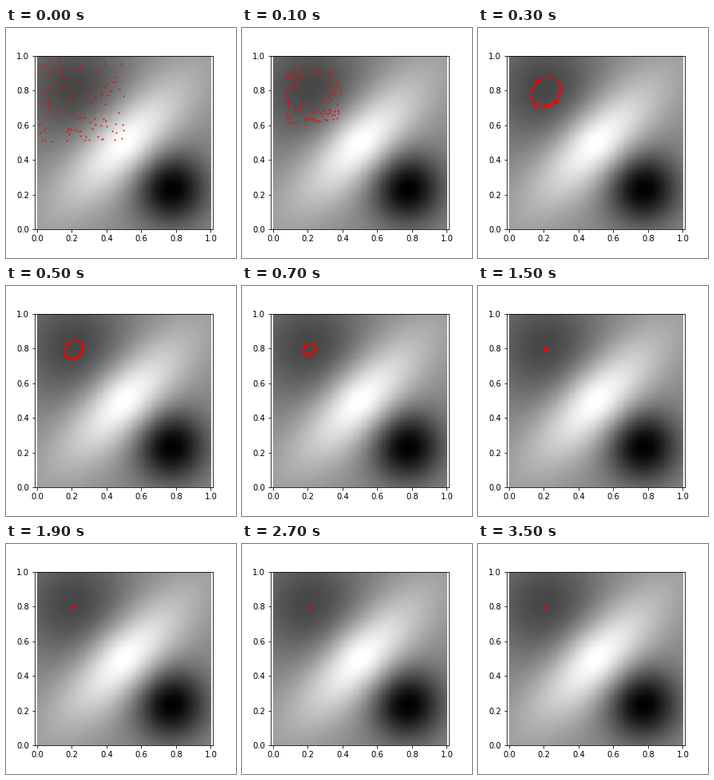
Recreate the animation shown at these times as a matplotlib script. Size 288 px wide and 288 px high, loop 5 s.

```python
import numpy as np
import matplotlib.pyplot as plt
from matplotlib.animation import FuncAnimation

FRAMES, STEP = 50, 100
POINTS = 115
GOAL = np.array([0.209, 0.794])
RING = 0.162      # ring radius at the first step, in data units
SHRINK = 0.79     # contraction of the ring per step
REST = 0.003      # radius that remains in the end
SETTLE = 0.55     # how fast points fall onto the ring

plt.rcParams.update({"font.family": "DejaVu Sans", "font.size": 10})


def landscape(n=100):
    """Grey levels: a bright diagonal ridge between two hollows."""
    x, y = np.meshgrid(*[(np.arange(n) + 0.5) / n] * 2)
    along, across = (x + y - 1) / np.sqrt(2), (x - y) / np.sqrt(2)
    ridge = np.exp(-np.abs(along / 0.45) ** 1.5 - (across / 0.19) ** 2)

    def hollow(cx, cy, width):
        return np.exp(-((x - cx) ** 2 + (y - cy) ** 2) / (2 * width ** 2))

    return (138 + 137 * ridge
            - 140 * hollow(0.77, 0.235, 0.145)
            - 68 * hollow(0.21, 0.81, 0.23))


rng = np.random.default_rng(11)
start = rng.uniform((0, 0.5), (0.5, 1), (POINTS, 2))
offset = start - GOAL
angle = np.arctan2(offset[:, 1], offset[:, 0])
heading = np.column_stack([np.cos(angle), np.sin(angle)])
oval = 1 + 0.14 * np.cos(2 * (angle - np.pi / 4))
excess = np.hypot(*offset.T) / (oval * (RING + REST)) - 1


def swarm(k):
    radius = oval * (RING * SHRINK ** k + REST) * (1 + excess * SETTLE ** k)
    return GOAL + heading * radius[:, None]


fig = plt.figure(figsize=(4, 4), dpi=72, facecolor="white")
fig.subplots_adjust(left=0.125, right=0.9, bottom=0.125, top=0.88)
ax = fig.add_subplot()
ax.imshow(landscape(), cmap="gray", vmin=0, vmax=255, origin="lower",
          extent=(0, 1, 0, 1), interpolation="nearest", aspect="auto")

# widen x so that both axes share one scale
pad = (0.775 / 0.755 - 1) / 2
ax.set(xlim=(-pad, 1 + pad), ylim=(0, 1))
dots, = ax.plot([], [], "r.", ms=2)


def update(k):
    dots.set_data(*swarm(k).T)
    return dots,


anim = FuncAnimation(fig, update, frames=FRAMES, interval=STEP,
                     repeat=True, repeat_delay=0, blit=False)
plt.show()
```
